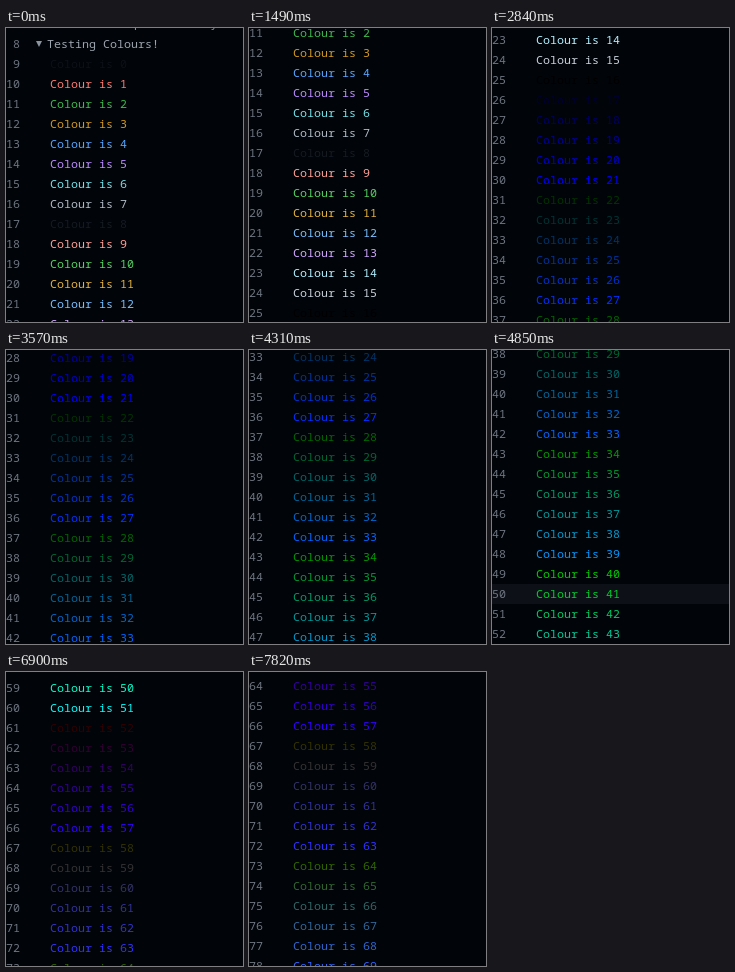
Write an HTML page that moves like this. It is 237x294 px and loops after 8 s.

```html
<!DOCTYPE html>
<html lang="en">
<head>
<meta charset="utf-8">
<title>Colour log</title>
<style>
  html, body { margin: 0; width: 100%; height: 100%; overflow: hidden; background: #010409; }
  svg { display: block; width: 100%; height: 100%; }
  text { font: 11.667px "Noto Sans Mono", "DejaVu Sans Mono", monospace; white-space: pre; }
  .num { fill: #6e7681; text-anchor: end; }
</style>
</head>
<body>
<svg viewBox="0 0 237 294">
  <rect width="237" height="294" fill="#010409"/>
  <rect id="hover" y="234" width="237" height="20" fill="#0d1117"/>
  <g id="log"></g>
</svg>
<script>
const LOOP = 8000, TICK = 60, ROW = 20, TOP = 144;
const ANSI = ['#0d1117', '#ff7b72', '#3fb950', '#d29922', '#58a6ff', '#bc8cff', '#76e3ea', '#b1bac4',
  '#161b22', '#ffa198', '#56d364', '#e3b341', '#79c0ff', '#d2a8ff', '#b3f0ff', '#c9d1d9'];

// Wheel steps: start time, phase of the first tick, duration, distance
const STEPS = [
  [1430, 73, 210, 102], [2170, 17, 210, 102], [2720, 73, 210, 102], [3390, 73, 210, 102],
  [4130, 17, 210, 102], [4670, 73, 210, 102], [5280, 73, 210, 102], [5950, 73, 210, 102],
  [6590, 15, 290, 204], [7520, 15, 270, 102]
];

const log = document.getElementById('log');
const hover = document.getElementById('hover');

function add(name, attrs, content = '') {
  const el = document.createElementNS('http://www.w3.org/2000/svg', name);
  for (const key in attrs) el.setAttribute(key, attrs[key]);
  el.textContent = content;
  log.append(el);
}

function colour(i) {
  if (i < 16) return ANSI[i];
  const c = i - 16;
  return `rgb(${[36, 6, 1].map(d => Math.floor(c / d) % 6 * 51)})`;
}

const baseline = line => line * ROW + 4;

add('text', { x: 44, y: baseline(7) - 1, fill: '#8b949e' }, 'Runner: setup then ready');
add('path', { d: `M30 ${baseline(8) - 7}h6l-3 6z`, fill: '#8b949e' });
add('text', { x: 41, y: baseline(8), fill: '#9da5ae' }, 'Testing Colours!');
for (let line = 8; line <= 80; line++) {
  const y = baseline(line), i = line - 9;
  add('text', { x: 14, y, class: 'num' }, line);
  if (i >= 0) add('text', { x: 44, y, fill: colour(i) }, `Colour is ${i}`);
}

function scrollAt(t) {
  let pos = TOP;
  for (const [start, phase, length, distance] of STEPS) {
    if (t < start) break;
    const tick = Math.floor((t - start) / TICK);
    const x = Math.min(1, (phase + tick * TICK) / length);
    pos += distance * x * x * (3 - 2 * x);
  }
  return Math.round(pos);
}

function draw(t) {
  log.setAttribute('transform', `translate(0 ${-scrollAt(t)})`);
  hover.setAttribute('visibility', t >= 4850 && t < 5280 ? 'visible' : 'hidden');
}

const begin = performance.now();
function frame() {
  draw((performance.now() - begin) % LOOP);
  requestAnimationFrame(frame);
}
frame();
</script>
</body>
</html>
```
